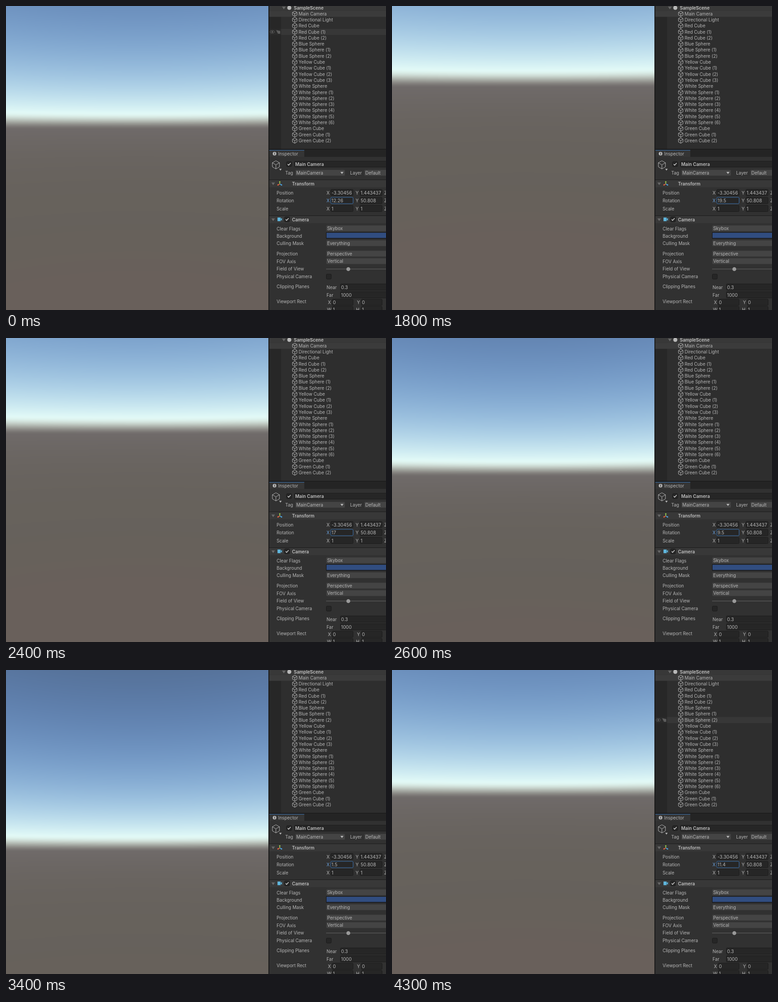
Write an HTML page with a canvas that moves like this. It is 837x669 px and loops after 4.9 s.

```html
<!DOCTYPE html>
<html lang="en">
<head>
<meta charset="utf-8">
<title>Camera pitch</title>
<style>
  html, body { margin: 0; width: 837px; height: 669px; overflow: hidden; background: #2e2e2e; }
  canvas { display: block; }
</style>
</head>
<body>
<canvas id="stage" width="837" height="669"></canvas>
<script>
const ctx = document.getElementById('stage').getContext('2d');
const LOOP = 4900, STEP = 100, VIEW_W = 578, H = 669;
const CENTER_Y = 417.7, FOCAL = 671;
const TEXT = '#b6b6b6', FIELD = '#262626', MENU = '#444', LINE = '#1a1a1a', ACCENT = '#3a72b0';

const smoothstep = (a, b, x) => {
  const p = Math.min(1, Math.max(0, (x - a) / (b - a)));
  return p * p * (3 - 2 * p);
};

// Three drags of the rotation value, snapped to half degrees while moving
const drags = [
  { start: 1480, end: 1950, to: 22 },
  { start: 2130, end: 3000, to: 0 },
  { start: 3280, end: 3840, to: 11.4 }
];
function pitchAt(t) {
  let pitch = 12.26;
  for (const { start, end, to } of drags) {
    if (t < start) break;
    if (t < end) return Math.round(2 * (pitch + (to - pitch) * smoothstep(start, end, t))) / 2;
    pitch = to;
  }
  return pitch;
}
function hoveredRow(t) {
  if (t < 200) return 'Red Cube (1)';
  if (t >= 4300) return 'Blue Sphere (2)';
  return t >= 4200 ? 'White Sphere (6)' : '';
}

// Colour of sky or ground by sine of elevation
function worldColor(s) {
  const near = Math.exp(Math.min(s, 0) / .09), warm = smoothstep(-.28, -.5, s);
  const ground = [102 + 9 * near + 3 * warm, 97 + 9 * near - warm, 91 + 14 * near];
  if (s <= 0) return ground;
  const sky = [70 + 200 * Math.exp(-s / .2), 76 + 205 * Math.exp(-s / .3), 257 - 205 * s];
  const haze = smoothstep(0, .053, s);
  return sky.map((c, i) => ground[i] + (c - ground[i]) * haze);
}
const LUT_HALF = 2000;
const lut = Array.from({ length: 2 * LUT_HALF + 1 }, (_, i) => worldColor(i / LUT_HALF - 1));

const view = ctx.createImageData(VIEW_W, H);
function drawView(pitch) {
  const rad = pitch * Math.PI / 180, sin = Math.sin(rad), cos = Math.cos(rad);
  let p = 0;
  for (let y = 0; y < H; y++) {
    const up = CENTER_Y - y, rise = up * cos - FOCAL * sin, sq = up * up + FOCAL * FOCAL;
    for (let x = 0; x < VIEW_W; x++) {
      const dx = x - VIEW_W / 2;
      const rgb = lut[Math.round((rise / Math.sqrt(sq + dx * dx) + 1) * LUT_HALF)];
      view.data[p++] = rgb[0];
      view.data[p++] = rgb[1];
      view.data[p++] = rgb[2];
      view.data[p++] = 255;
    }
  }
  ctx.putImageData(view, 0, 0);
}

function rect(x, y, w, h, color) {
  ctx.fillStyle = color;
  ctx.fillRect(x, y, w, h);
}
function text(str, x, y, color = TEXT, weight = 400, size = 9.9) {
  ctx.font = `${weight} ${size}px Inter, sans-serif`;
  ctx.fillStyle = color;
  ctx.fillText(str, x, y + 3.6);
}
const bold = (str, x, y) => text(str, x, y, '#c0c0c0', 600);
function poly(points, color) {
  ctx.beginPath();
  points.forEach(p => ctx.lineTo(...p));
  ctx.fillStyle = color;
  ctx.fill();
}
function line(points, color, width = 1) {
  ctx.beginPath();
  points.forEach(p => ctx.lineTo(...p));
  ctx.strokeStyle = color;
  ctx.lineWidth = width;
  ctx.stroke();
  ctx.lineWidth = 1;
}
function dot(x, y, r, color) {
  ctx.beginPath();
  ctx.arc(x, y, r, 0, 7);
  ctx.fillStyle = color;
  ctx.fill();
}
const polar = (x, y, r, sixth) =>
  [x + r * Math.sin(sixth * Math.PI / 3), y - r * Math.cos(sixth * Math.PI / 3)];
const arrow = (x, y, color, r = 4) =>
  poly([[x - r, y - r * .6], [x + r, y - r * .6], [x, y + r * .8]], color);
function box(x, y, w, h, fill, border) {
  ctx.beginPath();
  ctx.roundRect(x + .5, y + .5, w - 1, h - 1, 2);
  ctx.fillStyle = fill;
  ctx.fill();
  ctx.strokeStyle = border;
  ctx.stroke();
}
function field(str, x, y, w, border = '#1c1c1c') {
  box(x, y - 8, w, 15, FIELD, border);
  text(str, x + 2, y, TEXT, 400, 10.2);
}
function menu(str, x, y, w = 140) {
  box(x, y - 7, w, 14, MENU, '#383838');
  text(str, x + 2.5, y);
}
function check(x, y, on = true) {
  box(x - 6, y - 6, 12, 12, FIELD, '#1b1b1b');
  if (on) line([[x - 3, y], [x - 1, y + 2.5], [x + 3.5, y - 2.5]], '#d8d8d8', 1.4);
}
function cube(x, y, r) {
  const corner = i => polar(x, y, r, i);
  line([0, 1, 2, 3, 4, 5, 0].map(corner), TEXT);
  line([corner(5), [x, y], corner(1)], TEXT);
  line([[x, y], corner(3)], TEXT);
}

const series = (name, last) =>
  Array.from({ length: last + 1 }, (_, i) => i ? `${name} (${i})` : name);
const objects = ['Main Camera', 'Directional Light', ...series('Red Cube', 2),
  ...series('Blue Sphere', 2), ...series('Yellow Cube', 3),
  ...series('White Sphere', 6), ...series('Green Cube', 2)];

function drawHoverIcons(y) {
  const color = '#5c5c5c';
  ctx.strokeStyle = color;
  ctx.beginPath();
  ctx.ellipse(586.5, y, 5, 3, 0, 0, 7);
  ctx.stroke();
  dot(586.5, y, 1.8, color);
  poly([[595, y - 4], [604, y - 2], [604, y + 4], [599, y + 4]], color);
}

function drawHierarchy(hovered) {
  rect(578, 0, 259, 316, '#2e2e2e');
  rect(580, 0, 26, 316, '#272727');
  rect(580, 0, 257, 10.5, '#383838');
  rect(580, 10.5, 257, 13.3, '#3b3b3b');
  arrow(612, 4, '#686868');
  dot(624, 4, 4.5, '#b8b8b8');
  bold('SampleScene', 634, 4);
  objects.forEach((name, i) => {
    const y = 17 + i * 13.3;
    if (name === hovered) {
      rect(580, y - 6.5, 26, 13.3, '#2b2b2b');
      rect(606, y - 6.5, 231, 13.3, '#373737');
      drawHoverIcons(y);
    }
    cube(636, y, 5.8);
    text(name, 644.5, y);
  });
}

function header(title, y) {
  rect(580, y - 9, 257, 1, LINE);
  rect(580, y - 8, 257, 16, '#383838');
  arrow(588.5, y, '#686868');
  bold(title, 630, y);
}

function drawObjectHeader() {
  rect(578, 316, 259, 353, '#313131');
  rect(578, 315, 259, 17, '#242424');
  rect(580, 317, 77, 15, '#353535');
  rect(580, 317, 77, 1, ACCENT);
  dot(591.5, 325, 4, TEXT);
  rect(591, 322.5, 1.2, 5, '#333');
  text('Inspector', 599.5, 325);
  cube(594.5, 349.5, 9);
  arrow(604.5, 360, TEXT, 2.8);
  check(623.5, 348);
  box(635, 341, 210, 14, FIELD, '#1c1c1c');
  bold('Main Camera', 637, 348);
  text('Tag', 615, 367.5);
  menu('MainCamera', 637, 367, 110);
  arrow(740, 367, TEXT, 3.5);
  text('Layer', 758, 367.5);
  menu('Default', 789, 367, 60);
}

function drawTransform(pitch, overPosition) {
  header('Transform', 391);
  ['#9bd14b', '#4fa3e0', '#e0633f'].forEach((color, i) => {
    const tip = polar(603, 391.5, 4.5, i * 2);
    line([[603, 391.5], tip], color, 1.5);
    dot(...tip, 1.5, color);
  });
  const values = {
    Position: ['-3.30456', '1.443437'], Rotation: [String(pitch), '50.808'], Scale: ['1', '1']
  };
  const borders = { Rotation: ACCENT, Position: overPosition ? '#606060' : undefined };
  Object.entries(values).forEach(([label, [x, y]], i) => {
    const row = 411 + i * 17.5;
    text(label, 596, row);
    text('X', 706, row, label === 'Rotation' ? '#6aa0dc' : TEXT);
    field(x, 715, row, 50, borders[label]);
    text('Y', 770, row);
    field(y, 779, row, 50);
    text('Z', 833, row);
  });
}

function pair(names, x, y, value) {
  names.forEach((name, i) => {
    text(name, x + i * 64, y);
    field(value, 718 + i * 64, y, 47);
  });
}

function drawCamera() {
  header('Camera', 470);
  rect(598, 465.5, 7, 8, '#5fb5dc');
  poly([[605, 469.5], [608, 466], [608, 473]], '#5fb5dc');
  check(619, 469.5);
  const groups = [
    ['Clear Flags', 'Background', 'Culling Mask'],
    ['Projection', 'FOV Axis', 'Field of View', 'Physical Camera'],
    ['Clipping Planes', '', 'Viewport Rect']
  ];
  const choices = {
    'Clear Flags': 'Skybox', 'Culling Mask': 'Everything',
    'Projection': 'Perspective', 'FOV Axis': 'Vertical'
  };
  let y = 490;
  for (const group of groups) {
    for (const label of group) {
      text(label, 596, y);
      if (choices[label]) menu(choices[label], 705, y - .7);
      y += 16.4;
    }
    y += 6.5;
  }
  rect(705, 498, 132, 14, '#151515');
  rect(706, 499, 131, 11.5, '#314d80');
  rect(705, 578, 132, 1.5, '#555');
  dot(754, 579, 4.3, '#999');
  check(711, 595.5, false);
  text('Near', 706, 619);
  field('0.3', 736, 619, 110);
  text('Far', 706, 636);
  field('1000', 736, 636, 110);
  pair(['X', 'Y'], 709, 652.5, '0');
  pair(['W', 'H'], 707, 668.5, '1');
}

let shown = '';
function frame(now) {
  const t = Math.floor(now % LOOP / STEP) * STEP;
  const pitch = pitchAt(t), hovered = hoveredRow(t), overPosition = t >= 600 && t < 900;
  const state = [pitch, hovered, overPosition].join();
  if (state !== shown) {
    shown = state;
    drawView(pitch);
    drawHierarchy(hovered);
    drawObjectHeader();
    drawTransform(pitch, overPosition);
    drawCamera();
    rect(578, 0, 2, H, LINE);
    rect(578, 314.5, 259, 1.5, LINE);
  }
  requestAnimationFrame(frame);
}
requestAnimationFrame(frame);
</script>
</body>
</html>
```
